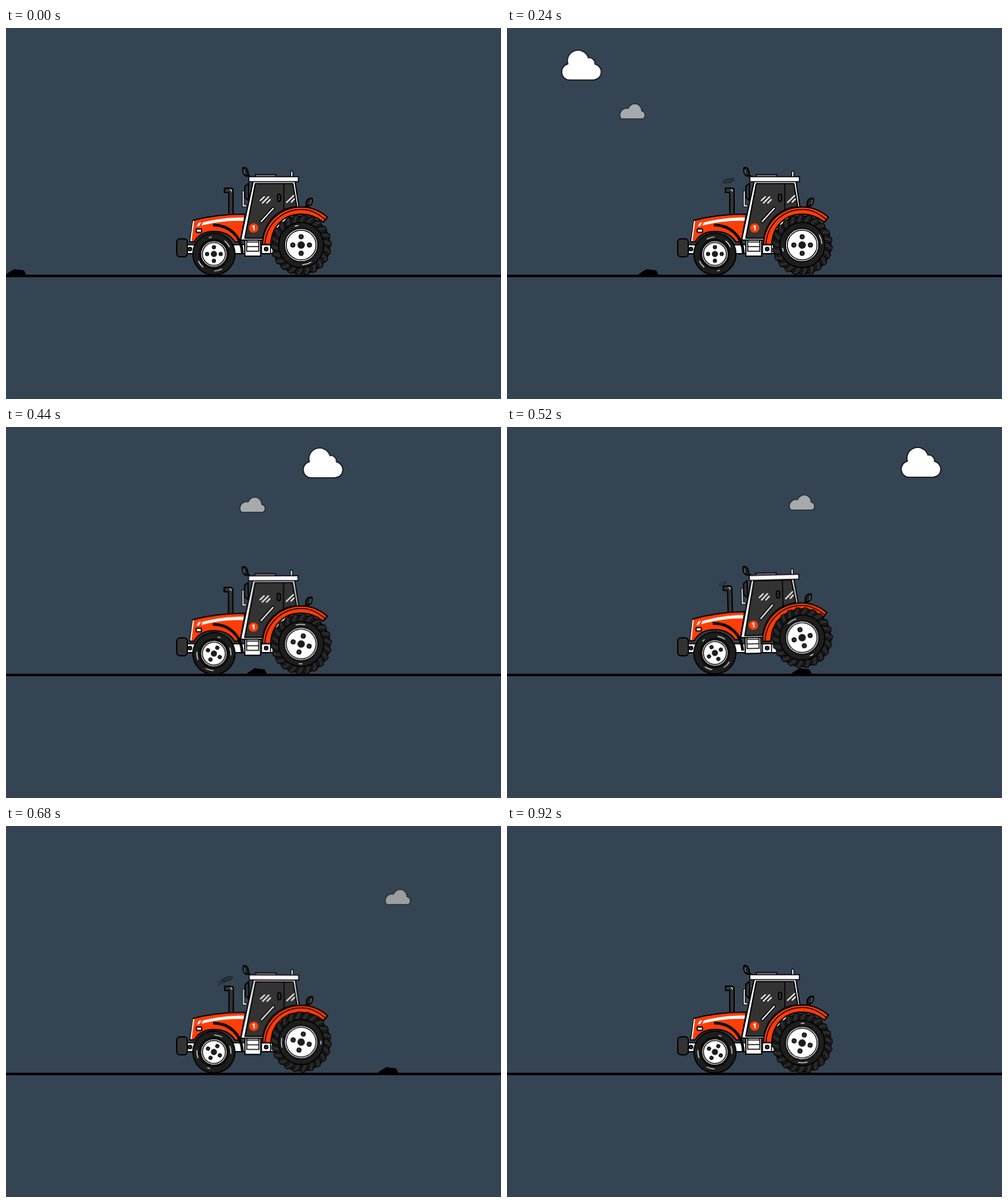
Write an HTML page that moves like this. It is 800 px wide and 600 px high and loops after 0.96 s.

```html
<!DOCTYPE html>
<html lang="en">
<head>
<meta charset="utf-8">
<title>Tractor</title>
<style>
  html, body { margin: 0; width: 100%; height: 100%; overflow: hidden; background: #344453; }
  svg { display: block; width: 800px; height: 600px; }

  .ink { stroke: #000; stroke-width: 2; stroke-linejoin: round; }
  .line { fill: none; stroke: #000; stroke-width: 1.6; }
  .white { fill: #fff; }
  .dark { fill: #333; }
  .red { fill: #ff3d08; }
  .glint { fill: none; stroke: #fff; stroke-width: 2; stroke-linecap: round; }
  .thin { stroke-width: 1.2; }

  /* everything moves on a 24-step beat */
  .move { animation: .96s steps(24) -1ms infinite; }
  .beat { animation: .96s step-end -1ms infinite; }

  #rock { animation-name: rock; }
  @keyframes rock { to { transform: translateX(849px); } }

  #big { animation-name: big; }
  @keyframes big {
    from { transform: translate(-384px, 38.2px); }
    to { transform: translate(1497.6px, 28.6px); }
  }

  #small { animation-name: small; }
  @keyframes small {
    from { transform: translate(-52.5px, 132px); }
    to { transform: translate(886.5px, 88.8px); }
  }
  #small path { animation-name: dim; }
  @keyframes dim {
    0%, 66.667% { fill: #a7aaac; stroke: #171c21; }
    70.833% { fill: #9b9d9f; }
    75% { fill: #8f9192; }
    79.167%, 100% { fill: #858686; stroke: #2a333b; }
  }

  #frontSpin { animation-name: frontSpin; }
  #rearSpin { animation-name: rearSpin; }
  @keyframes frontSpin { to { transform: rotate(-720deg); } }
  @keyframes rearSpin { to { transform: rotate(-360deg); } }

  #frontHop { animation-name: frontHop; }
  @keyframes frontHop {
    0%, 100% { transform: none; }
    33.333% { transform: translateY(-1.7px); }
    37.5% { transform: translateY(-10px); }
    41.667% { transform: translateY(-3px); }
    45.833% { transform: translateY(1px); }
    50% { transform: none; }
  }
  #rearHop { animation-name: rearHop; }
  @keyframes rearHop {
    0%, 100% { transform: none; }
    50% { transform: translateY(-2px); }
    54.167% { transform: translateY(-10.3px); }
    58.333% { transform: translateY(-3px); }
    62.5% { transform: translateY(1px); }
    66.667% { transform: none; }
    70.833% { transform: translateY(-1.5px); }
    75% { transform: translateY(-2.6px); }
    79.167% { transform: translateY(-2.3px); }
    83.333% { transform: translateY(-1.2px); }
    87.5% { transform: none; }
  }

  #noseTilt { animation-name: noseTilt; transform-origin: 476px 400px; }
  @keyframes noseTilt {
    0%, 100% { transform: none; }
    37.5% { transform: rotate(1.5deg); }
    41.667% { transform: rotate(.8deg); }
    45.833% { transform: rotate(-.2deg); }
    50% { transform: none; }
  }
  #tailTilt { animation-name: tailTilt; transform-origin: 290px 400px; }
  @keyframes tailTilt {
    0%, 100% { transform: none; }
    50% { transform: rotate(-.4deg); }
    54.167% { transform: rotate(-1.5deg); }
    58.333% { transform: rotate(-.8deg); }
    62.5% { transform: none; }
    70.833% { transform: rotate(.2deg); }
    75% { transform: rotate(.3deg); }
    83.333% { transform: rotate(.15deg); }
    87.5% { transform: none; }
  }
  #roof { animation-name: roof; transform-origin: 393px 245px; }
  @keyframes roof {
    0%, 100% { transform: none; }
    50% { transform: translate(.8px, .6px); }
    54.167% { transform: translate(3.2px, 2.4px); }
    58.333% { transform: translate(1.6px, 1.2px); }
    62.5% { transform: rotate(-.7deg); }
    66.667% { transform: none; }
  }

  #wisp { animation-name: wisp; }
  @keyframes wisp {
    0%, 100% { opacity: 0; }
    12.5% { opacity: .5; }
    16.667% { opacity: .95; }
    20.833% { opacity: .6; }
    25% { opacity: 0; }
    54.167% { opacity: .35; }
    58.333% { opacity: .7; }
    62.5% { opacity: .95; }
    66.667% { opacity: .6; }
    70.833% { opacity: .35; }
    79.167% { opacity: .25; }
    83.333% { opacity: 0; }
  }
  #leaf { animation-name: leaf; }
  @keyframes leaf {
    0% { opacity: 0; animation-timing-function: step-end; }
    20.833% { opacity: .9; transform: translate(352px, 250px) scale(.6); animation-timing-function: steps(3); }
    33.333% { opacity: .4; transform: translate(369.5px, 241.5px); animation-timing-function: steps(2); }
    41.667% { opacity: 0; transform: translate(376px, 238px); animation-timing-function: step-end; }
    66.667% { opacity: .9; transform: translate(352px, 250px) scale(.6); animation-timing-function: steps(3); }
    79.167% { opacity: .7; transform: translate(367.5px, 242.5px); animation-timing-function: steps(2); }
    87.5%, 100% { opacity: 0; transform: translate(376px, 238px); }
  }
</style>
</head>
<body>
<svg viewBox="0 0 800 600">
  <g id="big" class="move">
    <path class="white" stroke="#000" stroke-width="1.4" d="M14.500 48.300A13.200 13.200 0 0 1 12 22.300A17.200 17.200 0 0 1 45 12.500A9 9 0 0 1 55.500 22.600A13 13 0 0 1 53.500 48.300Z"/>
  </g>
  <g id="small" class="move">
    <path class="beat" stroke-width="1.2" d="M2.500 25.500A10.500 10.500 0 0 1 13.500 9A11.300 11.300 0 0 1 35.500 13A6.800 6.800 0 0 1 37.500 25.500Z"/>
  </g>

  <rect y="399" width="800" height="4"/>
  <path id="rock" class="move" d="M-1 400L2 397L13 390L29 392L33 400Z"/>

  <g fill="#2d3338" stroke="#0b0e11" stroke-width="1.4" stroke-linejoin="round">
    <path id="wisp" class="beat" d="M345 258.500C342 255 343 251.500 347 250.800L354.500 250C355.500 252 352 254.300 348.500 254.500C345.500 254.700 344.300 256 345 258.500Z"/>
    <path id="leaf" class="move" d="M-12 4C-9 -2 0 -6 12 -4.500C12 1 -2 7 -12 4Z"/>
  </g>

  <!-- chassis stays level -->
  <rect class="white ink" x="292" y="350.500" width="150" height="14.500"/>
  <rect class="dark ink" x="276" y="341" width="17" height="29" rx="5"/>
  <circle class="dark ink" cx="297.200" cy="357.500" r="2.800"/>
  <path class="line" d="M413 350V365M427.500 350V365"/>
  <circle class="dark ink" cx="420.500" cy="357.500" r="2.800"/>

  <g id="noseTilt" class="beat"><g id="tailTilt" class="beat">
    <!-- step -->
    <rect class="white ink" x="386" y="341" width="25.500" height="28"/>
    <path class="line" d="M389 343V361H408.500V343M389 346H408.500M389 353.500H408.500"/>

    <!-- exhaust -->
    <path class="dark ink" d="M353 259H363Q367 259 367 263V303H360V266H353Z"/>
    <path class="glint thin" d="M362 261.500Q364.500 261.500 364.500 264"/>

    <!-- cab -->
    <path class="white ink thin" d="M382 263.500H385V286H389V289H382Z"/>
    <path class="dark ink" d="M386 256L392 251V279L386 274Z"/>
    <path class="white ink" d="M399.500 248H467L473.500 290L420 343H379Z"/>
    <path class="dark ink" d="M403 251.500H463.500L470 289C443 291 420 310 415 340H386Z"/>
    <path class="line" d="M449 251V293"/>
    <rect class="dark ink" x="438.800" y="269" width="5" height="11.500" rx="2.400"/>
    <path class="glint" d="M411 279L417.500 273M414.500 283L424.500 273M421.500 283L427 277.500M453.500 282L465 271M461 281.500L466 276.500"/>
    <path d="M412.500 313L432 291.500" stroke="#000" stroke-width="5" stroke-linecap="round"/>
    <path class="glint" d="M412.500 313L432 291.500"/>
    <circle class="red" cx="400.200" cy="323.500" r="7.600"/>
    <text x="400" y="327.300" text-anchor="middle" font-family="Open Sans, sans-serif" font-size="10.500" font-weight="800" fill="#fff">1</text>

    <!-- roof -->
    <g id="roof" class="beat">
      <path d="M390 237L396 241" stroke="#000" stroke-width="2.500"/>
      <path class="ink" fill="#222" d="M383 226C388 224 392 229 391.500 239C387 241.500 381 236 383 226Z"/>
      <path d="M385 229Q384 233 386 236" fill="none" stroke="#aaa" stroke-width=".9"/>
      <rect x="403" y="237" width="33" height="4" fill="#857f8b" stroke="#000" stroke-width="1.500"/>
      <rect class="white" x="460.200" y="231.500" width="3.300" height="10" rx="1" stroke="#000" stroke-width="1.300"/>
      <rect x="392.500" y="240.500" width="80" height="8" fill="#fdf5ff" stroke="#000" stroke-width="1.600"/>
    </g>

    <!-- rear fender and lamp -->
    <path d="M483 291L488 284" stroke="#000" stroke-width="3"/>
    <path class="ink" fill="#222" d="M486 288C483 281 488 274 495 275.500C496 283 493 289 486 288Z"/>
    <path d="M493 278Q493.500 282 491.500 285" fill="none" stroke="#aaa" stroke-width=".9"/>
    <path class="red ink" d="M414.500 350C416 315 442 289.500 478 289.500C496 289.500 509 297 519.500 306L513 314C502 305 491 301 477 301C448 301 429 322 428 350Z"/>
    <path class="line" d="M418.500 350C420 318 446 293.500 478 293.500C494 293.500 506 301 516 310"/>

    <!-- hood -->
    <path class="red ink" d="M302.500 311C325 305 352 301 386.500 301L386 306L379 343L378 346H370C362 333 350 329 336 329C322 329 311 334 304 346H297Z"/>
    <path class="white" d="M318 314.500C340 309 360 306.500 384.500 306.500L383.500 312C360 311 338 314 316 319.500Z"/>
    <path class="white" d="M311.500 315L315.500 314L312.500 320L308 321Z"/>
    <path class="glint" d="M303 313L298.800 344"/>
    <rect class="white ink" x="307.500" y="325" width="8.500" height="5.500" rx="1"/>
    <path d="M334.500 318.500C360 319 380 335 382 364" fill="none" stroke="#000" stroke-width="4.500"/>
  </g></g>

  <g transform="translate(336 365.500)"><g id="frontHop" class="beat"><g id="frontSpin" class="move"></g></g></g>
  <g transform="translate(477 351)"><g id="rearHop" class="beat"><g id="rearSpin" class="move"></g></g></g>
</svg>
<script>
  const NS = 'http://www.w3.org/2000/svg';

  function add(parent, tag, attrs) {
    const el = document.createElementNS(NS, tag);
    for (const key in attrs) el.setAttribute(key, attrs[key]);
    parent.append(el);
  }

  const disc = (g, r, fill, width = 0, cx = 0, cy = 0) =>
    add(g, 'circle', { cx, cy, r, fill, stroke: '#000', 'stroke-width': width });

  // Arc of a circle around the hub, angles in degrees
  function glint(g, r, from, to) {
    const at = a => [r * Math.cos(a * Math.PI / 180), r * Math.sin(a * Math.PI / 180)];
    add(g, 'path', { class: 'glint thin', d: `M${at(from)}A${r} ${r} 0 0 1 ${at(to)}` });
  }

  function rim(g, r, bolt, dist, hub) {
    disc(g, r + .5, '#fff', 2);
    disc(g, r - 2.4, '#fff', 1.5);
    for (let i = 0; i < 4; i++) {
      const a = i * Math.PI / 2;
      disc(g, bolt, '#333', 1.5, dist * Math.cos(a), dist * Math.sin(a));
    }
    disc(g, hub, '#1c1c1c');
  }

  const front = document.getElementById('frontSpin');
  disc(front, 34, '#1d1e1c', 2);
  disc(front, 24, '#151615', 1);
  glint(front, 27.5, -106, -98);
  glint(front, 27.5, -50, -25);
  glint(front, 27.5, 62, 88);
  glint(front, 27.5, 130, 155);
  rim(front, 21, 2.6, 11, 5);

  const rear = document.getElementById('rearSpin');
  const lugs = 22;
  disc(rear, 46.5, '#1b1b1b', 1.5);
  for (let i = 0; i < lugs; i++) {
    const transform = `rotate(${i * 360 / lugs})`;
    add(rear, 'path', {
      transform, d: 'M-4 -36C-5 -41 -2 -45 3 -49L8.500 -47.500C4 -44 2 -40 3 -36Z',
      fill: '#262626', stroke: '#000', 'stroke-width': 1.2
    });
    add(rear, 'path', {
      transform, d: 'M7.500 -47C3.500 -44 2 -41 2.200 -37.500',
      fill: 'none', stroke: '#6c6c6a', 'stroke-width': .6
    });
  }
  disc(rear, 36.5, '#1d1e1d', 1.8);
  glint(rear, 32, -108, -99);
  glint(rear, 32, 60, 86);
  rim(rear, 26.5, 3.3, 13.4, 6);
</script>
</body>
</html>
```
